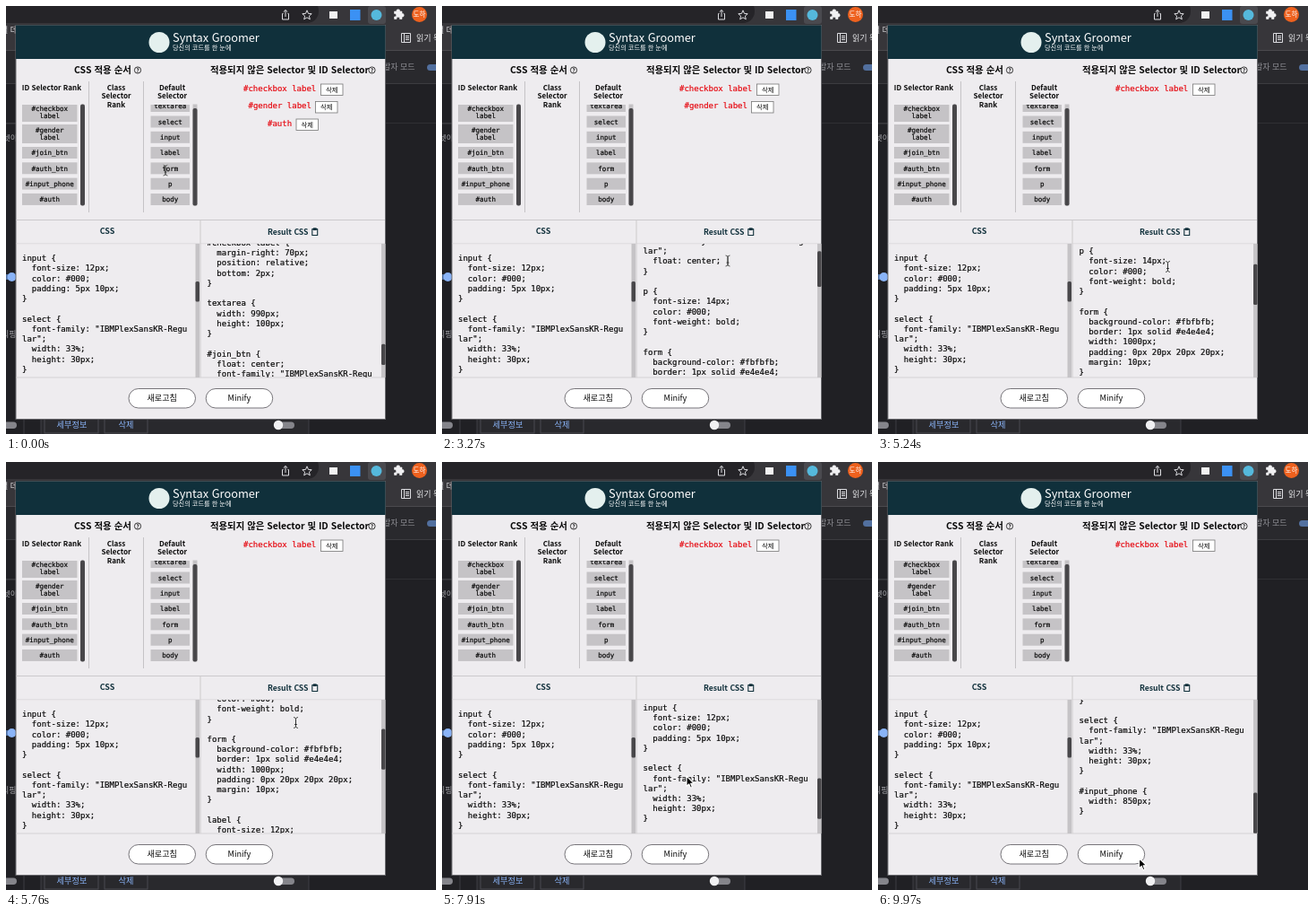
These frames come from a looping animation (480 px wide and 477 px high, 10 s). An HTML page:

```html
<!DOCTYPE html>
<html lang="ko">
<head>
<meta charset="utf-8">
<title>Syntax Groomer</title>
<style>
html, body { margin: 0; width: 100%; height: 100%; overflow: hidden; background: #202024; }
svg { display: block; width: 480px; height: 477px; }
text { font-family: "Noto Sans CJK KR", "Noto Sans CJK", "Noto Sans", sans-serif; white-space: pre; stroke-width: 0; }
.mono { font-family: "DejaVu Sans Mono", monospace; stroke-width: .2px; }
.bold { font-weight: 700; }
.medium { font-weight: 500; }
.mid { text-anchor: middle; }
</style>
</head>
<body>
<svg id="stage" viewBox="0 0 480 477"></svg>
<script>
const LOOP = 10000, LINE = 11.23;
const VIEW = { top: 265, height: 149 };
const TEAL = '#10303b', PANEL = '#eeecef', GRAY = '#c5c3c6', THUMB = '#48474a';

// Text is placed by the vertical centre of its capitals.
const text = (x, y, str, size, cls = '', fill = '#0a0a0a') =>
  `<text x="${x}" y="${y + size * .36}" font-size="${size}" class="${cls}" fill="${fill}" stroke="${fill}">${str}</text>`;
const rect = (x, y, w, h, fill, extra = '') =>
  `<rect x="${x}" y="${y}" width="${w}" height="${h}" fill="${fill}" ${extra}/>`;
const circle = (x, y, r, fill, extra = '') =>
  `<circle cx="${x}" cy="${y}" r="${r}" fill="${fill}" ${extra}/>`;
const path = (d, stroke, width = 1, fill = 'none') =>
  `<path d="${d}" stroke="${stroke}" stroke-width="${width}" fill="${fill}" stroke-linejoin="round"/>`;
const code = (lines, x, y) => lines.map((s, i) => text(x, y + i * LINE, s, 9, 'mono')).join('');

const FONT = ['font-family: "IBMPlexSansKR-Regu', '\nlar";'];
const rule = (name, ...decls) =>
  [name + ' {', ...decls.map(d => d[0] === '\n' ? d.slice(1) : '  ' + d), '}'];
const sheet = rules => rules.flatMap((r, i) => i ? ['', ...r] : r);

const inputRule = rule('input', 'font-size: 12px;', 'color: #000;', 'padding: 5px 10px;');
const selectRule = rule('select', ...FONT, 'width: 33%;', 'height: 30px;');
const labelOffset = ['margin-right: 70px;', 'position: relative;', 'bottom: 2px;'];
const genderRule = rule('#gender label', ...labelOffset);
const phoneRule = rule('#input_phone', 'width: 850px;');
const base = [
  rule('body', ...FONT, 'float: center;'),
  rule('p', 'font-size: 14px;', 'color: #000;', 'font-weight: bold;'),
  rule('form', 'background-color: #fbfbfb;', 'border: 1px solid #e4e4e4;', 'width: 1000px;',
    'padding: 0px 20px 20px 20px;', 'margin: 10px;'),
  rule('label', 'font-size: 12px;', 'color: #000;'),
  inputRule, selectRule
];
const button = ['float: center;', ...FONT, 'width: 100px;', 'height: 30px;'];
const sheets = [
  sheet([...base, phoneRule, genderRule,
    rule('#auth', 'width: 200px;', 'height: 30px;', 'color: #000;'),
    rule('#auth_btn', ...button),
    rule('#checkbox label', ...labelOffset),
    rule('textarea', 'width: 990px;', 'height: 100px;'),
    rule('#join_btn', ...button, 'color: #000;', 'border: none;')]),
  sheet([...base, genderRule, phoneRule]),
  sheet([...base, phoneRule])
];

function browser() {
  const icon = '#dcdce0', link = '#8ab4f8', edge = '#4a4a50';
  return rect(0, 0, 480, 50, '#37363a') + rect(-20, -8, 369, 27, '#252428', 'rx="13"') +
    rect(0, 49, 480, 1, '#4b4a4e') +
    rect(0, 50, 480, 36, '#29292d') + rect(0, 86, 480, 1, '#3c3c40') +
    rect(0, 130, 480, 1, '#303034') +
    path('M309.5 8.5H308.5V15H315.5V8.5H314.5M312 12V4.5M309.7 6.7L312 4.5L314.3 6.7', icon) +
    path('M336 4.8L337.5 8.4L341.2 8.7L338.4 11.1L339.3 14.8L336 12.8L332.7 14.8L333.6 11.1L330.8 8.7L334.5 8.4Z', icon) +
    rect(361, 6, 9, 8, '#f2f2f2') + rect(384, 4, 11.5, 12, '#3b91f4') +
    rect(404, 0, 20, 20, '#4a4a4f', 'rx="3"') + circle(413.5, 10, 6, '#55b9dc') +
    path('M433.5 6H436A1.8 1.8 0 1 1 439.5 6H442V8.5A1.8 1.8 0 1 1 442 12V14.5H439.5A1.8 1.8 0 1 0 436 14.5H433.5V12A1.8 1.8 0 1 0 433.5 8.5Z', '#f1f1f3', .6, '#f1f1f3') +
    circle(461.5, 9.5, 8.5, '#ee611e') + text(461.5, 9.5, '도하', 7.5, 'mid', '#fff') +
    path('M441.5 30.5H451.5V40.5H441.5ZM444.5 30.5V40.5M446 33.5H450M446 35.5H450M446 37.5H450', icon) +
    text(458, 35.5, '읽기 목록', 9, 'medium', '#e6e6e9') +
    text(-6, 27, '털 데', 9, '', '#dcdce0') +
    text(421, 68, '발자 모드', 9, '', '#8f8f95') +
    rect(470, 65, 20, 7, '#52709f', 'rx="3.5"') +
    text(-3, 147, '넷이', 8.5, '', '#a5a5aa') + text(-5, 366, '리핑', 9, '', '#a5a5aa') +
    rect(-10, 299, 18, 6, '#52709f', 'rx="3"') + circle(6.5, 302, 5, '#8ab4f8') +
    rect(-1, 131, 21, 350, 'none', `stroke="${edge}" stroke-width=".7"`) +
    rect(39, 440, 299, 50, '#29292d', `stroke="${edge}" stroke-width=".7"`) +
    rect(43, 455, 60, 21, 'none', `stroke="${edge}"`) + rect(110, 455, 48, 21, 'none', `stroke="${edge}"`) +
    text(73.5, 467, '세부정보', 9.2, 'mid medium', link) + text(134, 467, '삭제', 9.2, 'mid medium', link) +
    rect(302, 463.5, 20, 7.5, '#85858b', 'rx="3.7"') + circle(304, 467, 5.2, '#f1f1f3') +
    rect(-8, 463.5, 20, 7.5, '#85858b', 'rx="3.7"');
}

const help = (x, y) => circle(x, y, 3.6, 'none', 'stroke="#222" stroke-width=".9"') + text(x, y, '?', 6, 'mid bold');

function chip(x, y, w, h, ...lines) {
  const mid = y + h / 2;
  return rect(x, y, w, h, GRAY) +
    lines.map((s, i) => text(x + w / 2, mid + (i - (lines.length - 1) / 2) * 7.8, s, 7.5, 'mid mono')).join('');
}

function unused(id, x, y, name, buttonX) {
  return `<g id="${id}">` + text(x, y, name, 9, 'mono', '#e60a12') +
    rect(buttonX, y - 4.5, 24.5, 12.5, '#fff', 'stroke="#777" stroke-width=".8"') +
    text(buttonX + 12.2, y + 1.7, '삭제', 7.3, 'mid') + '</g>';
}

function popup() {
  const heads = [[51, 'ID Selector Rank'], [123, 'Class', 'Selector', 'Rank'], [185.5, 'Default', 'Selector']];
  const tags = ['select', 'input', 'label', 'form', 'p', 'body'];
  const ids = ['#join_btn', '#auth_btn', '#input_phone', '#auth'];
  const pill = (x, label) => rect(x, 426.5, 74.5, 21.5, '#fff', 'rx="10.75" stroke="#77757a"') +
    text(x + 37.2, 437, label, 9.1, 'mid');
  return rect(11, 21.5, 412.5, 439, PANEL, 'stroke="#69696d"') + rect(11, 21.5, 412.5, 37.5, TEAL) +
    circle(171, 40.5, 11.5, '#e4f0ee') +
    text(186, 35, 'Syntax Groomer', 12.8, 'medium', '#fff') +
    text(186, 46.5, '당신의 코드를 한 눈에', 7.2, 'medium', '#fff') +
    text(76, 71.5, 'CSS 적용 순서', 10.5, 'bold') + help(147, 71.5) +
    text(228, 71.5, '적용되지 않은 Selector 및 ID Selector', 10.4, 'bold') + help(408.5, 71.5) +
    heads.map(([x, ...words]) => words.map((w, i) => text(x, 91 + i * 9.4, w, 8.1, 'mid bold')).join('')).join('') +
    rect(92, 84, 1, 146, GRAY) + rect(153, 84, 1, 146, GRAY) +
    `<g clip-path="url(#ranks)">` +
    chip(18, 107.5, 61.5, 21.5, '#checkbox', 'label') + chip(18, 132, 61.5, 21, '#gender', 'label') +
    ids.map((s, i) => chip(18, 157 + i * 17.3, 61.5, 13, s)).join('') +
    chip(161.5, 105, 43.5, 13, 'textarea') +
    tags.map((s, i) => chip(161.5, 122.5 + i * 17.3, 43.5, 13, s)).join('') + '</g>' +
    rect(83, 109.5, 5, 113, THUMB, 'rx="2"') +
    rect(208.5, 109.5, 5, 113, GRAY) + rect(208.5, 114, 5, 108.5, THUMB, 'rx="2"') +
    unused('checkbox', 265, 91.5, '#checkbox label', 351.5) +
    unused('gender', 270.5, 111, '#gender label', 345.5) +
    unused('auth', 292, 130.5, '#auth', 324) +
    rect(11.5, 238, 411.5, 1, '#cbc9cc') + rect(216.5, 239, 1, 175, '#cbc9cc') +
    text(113, 251, 'CSS', 9, 'mid bold', TEAL) + text(314.7, 251.5, 'Result CSS', 8.7, 'mid bold', TEAL) +
    path('M341.8 248.5H347.7V255.5H341.8ZM343.3 248V249.5H346.2V247.7H343.3Z', TEAL, 1.1) +
    rect(11.5, 264.5, 411.5, .7, '#d5d3d6') + rect(11.5, 413.5, 411.5, 1, '#d5d3d6') +
    code([...inputRule, '', ...selectRule], 18, 281) +
    rect(211.5, 265, 4.5, 149, GRAY) + rect(211.5, 307, 4.5, 22.5, THUMB, 'rx="1.5"') +
    '<g clip-path="url(#view)"><g id="result"></g></g>' +
    rect(419, 265, 4.5, 149, GRAY) + rect(419, 265, 4.5, 20, THUMB, 'id="thumb" rx="1.5"') +
    pill(137, '새로고침') + pill(223.2, 'Minify');
}

const beam = 'M-2.5 -6Q0 -6 0 -4V4Q0 6 -2.5 6M2.5 -6Q0 -6 0 -4V4Q0 6 2.5 6M-1.5 2H1.5';
const arrow = 'M0 0V11.5L2.7 9L4.5 13.2L6.4 12.4L4.7 8.3H8.3Z';
document.getElementById('stage').innerHTML =
  `<clipPath id="view">${rect(217, VIEW.top, 202, VIEW.height, '#000')}</clipPath>` +
  `<clipPath id="ranks">${rect(11, 110, 200, 113, '#000')}</clipPath>` +
  browser() + popup() +
  `<g id="beam">${path(beam, '#fff', 1.6)}${path(beam, '#222', .8)}</g>` +
  `<g id="arrow">${path(arrow, '#fff', 1.2, '#000')}</g>`;
const $ = id => document.getElementById(id);

// Rows are [time, ...values].
const pointer = [[0, 178, 183], [500, 178, 183], [1300, 335, 131], [1900, 335, 131], [2300, 339.5, 133],
  [2450, 339.5, 133], [2750, 319, 284], [3600, 319, 284], [4100, 356, 111], [4450, 356, 111],
  [4900, 323.5, 290.5], [5900, 323.5, 290.5], [6700, 229, 365], [7200, 229, 365], [7700, 273, 350],
  [8700, 273, 350], [9400, 291.5, 441.5], [LOOP, 291.5, 441.5]];
const scrolling = [[0, 713.5], [1899, 713.5], [1900, 409], [2780, 409], [3250, 30.5], [5000, 30.5], [5240, 75.3],
  [6910, 177], [7910, 288], [8600, 341.3], [LOOP, 341.3]];
const beamTimes = [[0, 560], [2620, 3700], [4750, 7400]];

function sample(track, t, ease = k => k) {
  const i = track.findIndex(row => row[0] > t), a = track[i - 1], b = track[i];
  const k = ease((t - a[0]) / (b[0] - a[0]));
  return a.slice(1).map((v, j) => v + (b[j + 1] - v) * k);
}
const smooth = k => k * k * (3 - 2 * k);
const show = (id, on) => $(id).setAttribute('visibility', on ? 'visible' : 'hidden');
let current = -1;

function draw() {
  const t = performance.now() % LOOP;
  const stage = t < 1900 ? 0 : t < 4300 ? 1 : 2;
  if (stage !== current) {
    current = stage;
    $('result').innerHTML = code(sheets[stage], 224.5, 281);
    show('auth', stage < 1);
    show('gender', stage < 2);
  }
  const [scroll] = sample(scrolling, t);
  const total = sheets[stage].length * LINE + 30.5;
  const ratio = VIEW.height / total;
  $('result').setAttribute('transform', `translate(0 ${-scroll})`);
  $('thumb').setAttribute('y', VIEW.top + scroll * ratio);
  $('thumb').setAttribute('height', VIEW.height * ratio);

  const [x, y] = sample(pointer, t, smooth);
  const onText = beamTimes.some(([from, to]) => t >= from && t < to);
  for (const id of ['beam', 'arrow']) $(id).setAttribute('transform', `translate(${x} ${y})`);
  show('beam', onText);
  show('arrow', !onText);
  requestAnimationFrame(draw);
}
draw();
</script>
</body>
</html>
```
